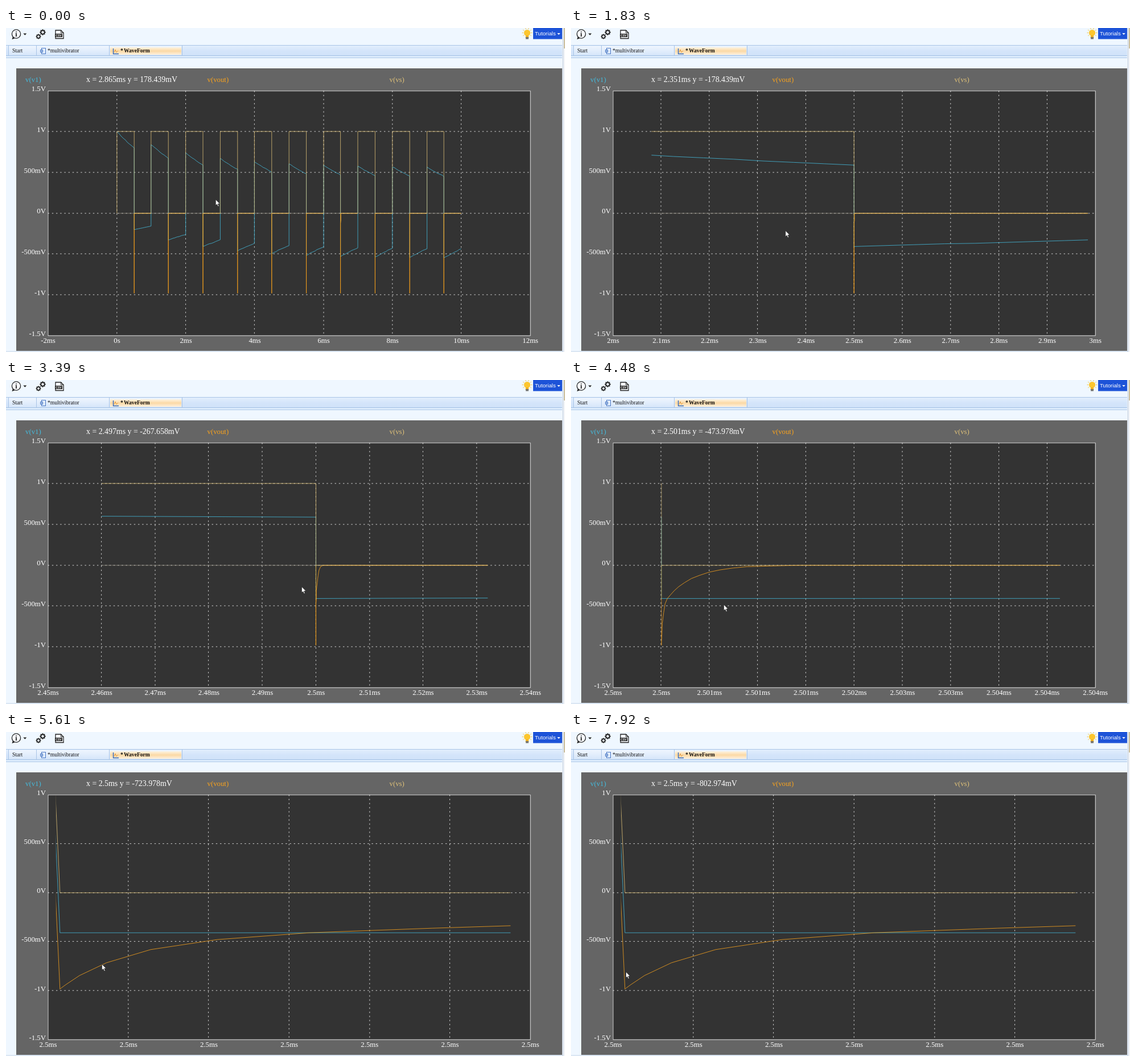
These frames come from a looping animation (982 by 570 pixels, 8000 ms). An HTML page with a canvas:

```html
<!DOCTYPE html>
<html lang="en">
<head>
<meta charset="utf-8">
<title>Waveform zoom</title>
<style>
html, body { margin: 0; width: 100%; height: 100%; overflow: hidden; background: #eff7ff; }
canvas { display: block; }
</style>
</head>
<body>
<canvas id="stage" width="982" height="570"></canvas>
<script>
const ctx = document.getElementById('stage').getContext('2d');
const LOOP = 8000, STEP = 77, TEXT_LAG = 65;
const SCALE = .8; // the chart is laid out on a larger grid of whole pixels
const BOX = { x: 92, y: 138, w: 1059, h: 538 };
const BOTTOM = -1.5;
const SERIF = '"Liberation Serif", "Times New Roman", serif';
const SANS = '"Liberation Sans", Arial, sans-serif';
const BLUE = '#45b9da', ORANGE = '#f8a21d', TAN = '#dcbf78';

// x in ms, y in V; lo and hi bound the plotted data, drag is when selecting the view began
const VIEWS = [
  { at: 0, x0: -2, x1: 12, cols: 7, top: 1.5, lo: -.01, hi: 10 },
  { drag: 820, at: 1370, x0: 2, x1: 3, cols: 10, top: 1.5, lo: 2.08, hi: 2.984 },
  { drag: 2380, at: 2840, x0: 2.45, x1: 2.54, cols: 9, top: 1.5, lo: 2.46, hi: 2.532 },
  { drag: 3500, at: 3930, x0: 2.4995, x1: 2.5045, cols: 10, top: 1.5, lo: 2.5, hi: 2.50413,
    labels: '2.5 2.5 2.501 2.501 2.501 2.502 2.503 2.503 2.504 2.504 2.504'.split(' ') },
  { drag: 5020, at: 5610, x0: 2.5, x1: 2.50012, cols: 6, top: 1, lo: 2.500002, hi: 2.500115 }
];

// pointer moves: begin, end, x, y
const REST = { x: 368.3, y: 301.8 };
const MOVES = [
  [363, 440, 368.3, 300.8], [510, 830, 320.3, 308.5], [830, 910, 323.5, 310.9],
  [990, 1370, 375, 342], [1615, 1760, 371.6, 352.6], [1760, 1830, 376.8, 356.6],
  [1830, 2380, 464, 396], [2380, 2840, 525, 447], [3090, 3315, 519.8, 365.4],
  [3315, 3390, 519.5, 363.8], [3390, 3500, 543, 372], [3500, 3790, 589, 395.3],
  [4175, 4480, 268.5, 395.3], [4480, 4780, 125, 397], [4780, 5020, 157, 398],
  [5020, 5540, 168.5, 408.5], [6000, 6390, 138.3, 394], [6540, 6620, 137.3, 394],
  [7000, 7850, 96.5, 422.1]
];

function pointer(t) {
  let p = REST;
  for (const [a, b, x, y] of MOVES) {
    if (t < a) break;
    const n = Math.max(1, Math.round((b - a) / STEP));
    const f = Math.min(1, Math.floor(n * (t - a) / (b - a) + 1e-6) / n);
    p = { x: p.x + (x - p.x) * f, y: p.y + (y - p.y) * f };
  }
  return p;
}
const toUnits = p => ({
  x: Math.round(p.x / SCALE - BOX.x - .5),
  y: Math.round((p.y - 1.2) / SCALE - BOX.y - .5)
});

// output after a falling edge, in volts, with a fast and a slow recovery
const recovery = us => -.485 * Math.exp(-us / .016) - .5 * Math.exp(-us / .285);

function buildSignals() {
  const v1 = [], vs = [[0, 0]], vout = [];
  const keep = .7985, half = .5, fall0 = 1.9e-6, fall1 = 3e-6;
  let v = 1;
  const discharge = (t, end) => {
    for (let i = 0; i <= 8; i++) v1.push([t + (end - t) * i / 8, v * keep ** (i / 8)]);
    v *= keep;
  };
  for (let k = 0; k < 10; k++) {
    const top = k + half + fall0, foot = k + half + fall1, pulse = [[top, 0]];
    discharge(k, top);
    v -= 1;
    discharge(foot, k + 1);
    v += 1;
    vs.push([k, 0], [k, 1], [top, 1], [foot, 0]);
    for (let i = 0; i <= 24; i++) {
      const us = 2.5 * (i / 24) ** 3;
      pulse.push([foot + us / 1000, recovery(us)]);
    }
    vout.push([...pulse, [k + 1, 0]]);
  }
  vs.push([10, 0]);
  return { v1, vs, vout };
}
const SIGNALS = buildSignals();

function fmt(v, unit) {
  const a = Math.abs(v);
  if (a < 1e-13) return '0' + unit;
  const [s, prefix] = [[1, ''], [1e-3, 'm'], [1e-6, 'u'], [1e-9, 'n']].find(([k]) => a >= k * .999999) || [1e-12, 'p'];
  return +(v / s).toFixed(3) + prefix + unit;
}

function text(s, x, y, font, color, align = 'left') {
  ctx.font = font;
  ctx.fillStyle = color;
  ctx.textAlign = align;
  ctx.fillText(s, x, y);
}
function rect(x, y, w, h, color) {
  ctx.fillStyle = color;
  ctx.fillRect(x, y, w, h);
}
function paint(fill, stroke, width) {
  if (fill) { ctx.fillStyle = fill; ctx.fill(); }
  if (stroke) { ctx.strokeStyle = stroke; ctx.lineWidth = width; ctx.stroke(); }
}
function poly(points, fill, stroke, width = 1) {
  ctx.beginPath();
  points.forEach(([x, y]) => ctx.lineTo(x, y));
  if (fill) ctx.closePath();
  paint(fill, stroke, width);
}
function circle(x, y, r, fill, stroke, width = 1) {
  ctx.beginPath();
  ctx.arc(x, y, r, 0, 7);
  paint(fill, stroke, width);
}
function spokes(x, y, r0, r1, n, color, width) {
  for (let i = 0; i < n; i++) {
    const c = Math.cos(i * 2 * Math.PI / n), s = Math.sin(i * 2 * Math.PI / n);
    poly([[x + c * r0, y + s * r0], [x + c * r1, y + s * r1]], null, color, width);
  }
}
function shade(y0, y1, ...colors) {
  const g = ctx.createLinearGradient(0, y0, 0, y1);
  colors.forEach((c, i) => g.addColorStop(i / (colors.length - 1), c));
  return g;
}
function gear(x, y, r) {
  circle(x, y, r, null, '#222', r * .6);
  spokes(x, y, r, r * 1.6, 8, '#222', r * .5);
}

function toolbar() {
  poly([[12, 15], [10.5, 20], [16, 18]], '#222');
  circle(18, 10.5, 7.6, '#f8fbff', '#222', 1.3);
  text('i', 18, 15, 'bold 12px ' + SERIF, '#222', 'center');
  poly([[30.3, 9.5], [36.3, 9.5], [33.3, 12.8]], '#222');
  gear(64.5, 7.5, 3.3);
  gear(57, 15, 2.8);
  poly([[87, 4], [96.5, 4], [101, 8.5], [101, 18.5], [87, 18.5]], '#f8fbff', '#222', 1.3);
  poly([[96.5, 4], [96.5, 8.5], [101, 8.5]], null, '#222');
  rect(86, 10, 13, 6, '#222');
  text('CSV', 92.5, 15, 'bold 5px ' + SANS, '#fff', 'center');

  spokes(915.5, 8.5, 6.5, 9, 10, '#f3c64c', 1);
  circle(915.5, 8.5, 5.6, '#fcc62e');
  rect(913, 13, 5, 3, '#f2b21f');
  rect(913, 16, 5, 3.5, '#77756f');
  rect(926, 0, 51, 19.5, '#1d53d8');
  text('Tutorials', 929, 13, '9.7px ' + SANS, '#fff');
  poly([[968.3, 9], [973.7, 9], [971, 12]], '#fff');
}

function tabs() {
  rect(0, 30, 978, 22, shade(30, 52, '#e3effd', '#d3e4fa', '#d0e2f9'));
  rect(0, 30, 978, 1, '#a9c4e6');
  rect(0, 48, 978, 1, '#a3c0e4');
  rect(0, 49, 978, 3, '#dcebfc');
  rect(0, 52, 978, 1, '#b0c9e8');
  rect(4, 32, 304, 16, shade(32, 48, '#eef5fe', '#d6e6fa'));
  rect(183, 34, 125, 13, shade(34, 47, '#fef3e0', '#fbd9a6', '#fef0dc'));
  [4, 53, 181, 309].forEach(x => rect(x, 31, 1, 17, '#a9c4e6'));
  const font = '9.6px ' + SERIF;
  text('Start', 11, 43, font, '#111');
  text('*multivibrator', 73, 43, font, '#111');
  text('*', 201, 43, 'bold ' + font, '#111');
  text('WaveForm', 207, 43, 'bold ' + font, '#111');
  ctx.lineWidth = 1;
  ctx.strokeStyle = '#4a78c4';
  ctx.strokeRect(62.5, 35.5, 7, 10);
  ctx.strokeRect(60.5, 38.5, 4, 4);
  poly([[188.5, 36], [188.5, 45.5], [198, 45.5]], null, '#2f67bd', 1.4);
  poly([[190, 43], [192, 38], [194, 43], [197, 40]], null, '#e49a3c');
}

function windowFrame() {
  rect(0, 0, 982, 570, '#eff7ff');
  toolbar();
  tabs();
  rect(977, 0, 5, 570, '#f2f4f7');
  rect(978, 0, 1, 570, '#b9cbe0');
  rect(980, 0, 2, 36, '#c9bd9c');
  rect(18, 71, 959, 497, '#656565');
  rect(0, 568.5, 978, 1, '#c5d5e8');
}

// draws in chart pixels
function onChart(fn) {
  ctx.save();
  ctx.scale(SCALE, SCALE);
  ctx.strokeStyle = '#fff';
  ctx.lineWidth = 1;
  fn();
  ctx.restore();
}
const snap = v => Math.floor(v) + .5;
const xOf = (t, view) => BOX.x + BOX.w * (t - view.x0) / (view.x1 - view.x0);
const yOf = (v, view) => BOX.y + BOX.h * (view.top - v) / (view.top - BOTTOM);

function plot(view) {
  const font = '12.8px ' + SERIF;
  const right = BOX.x + BOX.w, bottom = BOX.y + BOX.h;
  const xs = [], ys = [];
  for (let i = 0; i <= view.cols; i++) {
    const t = view.x0 + (view.x1 - view.x0) * i / view.cols, x = xOf(t, view);
    xs.push(snap(x));
    text(view.labels ? view.labels[i] + 'ms' : fmt(t / 1000, 's'), (x + .5) * SCALE, 554, font, '#fff', 'center');
  }
  for (let v = BOTTOM; v <= view.top; v += .5) {
    const y = yOf(v, view);
    ys.push(snap(y));
    text(fmt(v, 'V'), 70, (y + 1) * SCALE, font, '#fff', 'right');
  }

  onChart(() => {
    rect(BOX.x, BOX.y, BOX.w, BOX.h, '#333');
    ctx.setLineDash([3, 6]);
    xs.slice(1, -1).forEach(x => poly([[x, BOX.y], [x, bottom]], null, '#fff'));
    ys.slice(1, -1).forEach(y => poly([[BOX.x, y], [right, y]], null, '#fff'));
    ctx.setLineDash([]);
    ctx.strokeRect(BOX.x + .5, BOX.y + .5, BOX.w, BOX.h);

    const left = xOf(view.lo, view);
    ctx.beginPath();
    ctx.rect(left, BOX.y, xOf(view.hi, view) + 1 - left, BOX.h);
    ctx.clip();
    ctx.lineJoin = 'bevel';
    const trace = (points, color) =>
      poly(points.map(([t, v]) => [snap(xOf(t, view)), snap(yOf(v, view))]), null, color);
    if (view.lo < 2.5) trace([[0, 0], [10, 0]], '#8e8a7c');
    trace(SIGNALS.v1, BLUE);
    SIGNALS.vout.forEach(p => trace(p, ORANGE));
    trace(SIGNALS.vs, TAN);
  });

  text('v(v1)', 34, 95, font, BLUE);
  text('v(vout)', 353.5, 95, font, ORANGE);
  text('v(vs)', 673.5, 95, font, TAN);
}

function readout(t, view) {
  const n = toUnits(pointer(t - TEXT_LAG));
  const kx = (view.x1 - view.x0) / BOX.w / 1000, ky = (view.top - BOTTOM) / BOX.h;
  const next = VIEWS.find(w => t >= w.drag && t < w.at);
  let s = `x = ${fmt(view.x0 / 1000 + n.x * kx, 's')} y = ${fmt(view.top - n.y * ky, 'V')}`;
  if (next) {
    const a = toUnits(pointer(next.drag + 10));
    const dx = n.x - a.x, dy = n.y - a.y;
    s = `dx = ${fmt(Math.abs(dx) * kx, 's')} dy = ${fmt(Math.abs(dy) * ky, 'V')}`;
    onChart(() => {
      ctx.setLineDash([3, 6]);
      ctx.strokeRect(BOX.x + a.x + .5, BOX.y + a.y + .5, dx, dy);
    });
  }
  text(s, 141, 95, '13.86px ' + SERIF, '#fff');
}

function arrow({ x, y }) {
  const shape = [[0, 0], [0, 10.3], [2.4, 8.2], [4.1, 12.1], [5.8, 11.4], [4.1, 7.6], [7.2, 7.3]];
  poly(shape.map(([a, b]) => [x + a, y + b]), '#fff', '#1a1a1a', .6);
}

function draw(now) {
  const t = now % LOOP;
  const view = VIEWS.filter(w => w.at <= t).pop();
  windowFrame();
  plot(view);
  readout(t, view);
  arrow(pointer(t));
}

let start;
function tick(now) {
  if (start === undefined) start = now;
  draw(now - start);
  requestAnimationFrame(tick);
}
draw(0);
requestAnimationFrame(tick);
</script>
</body>
</html>
```
